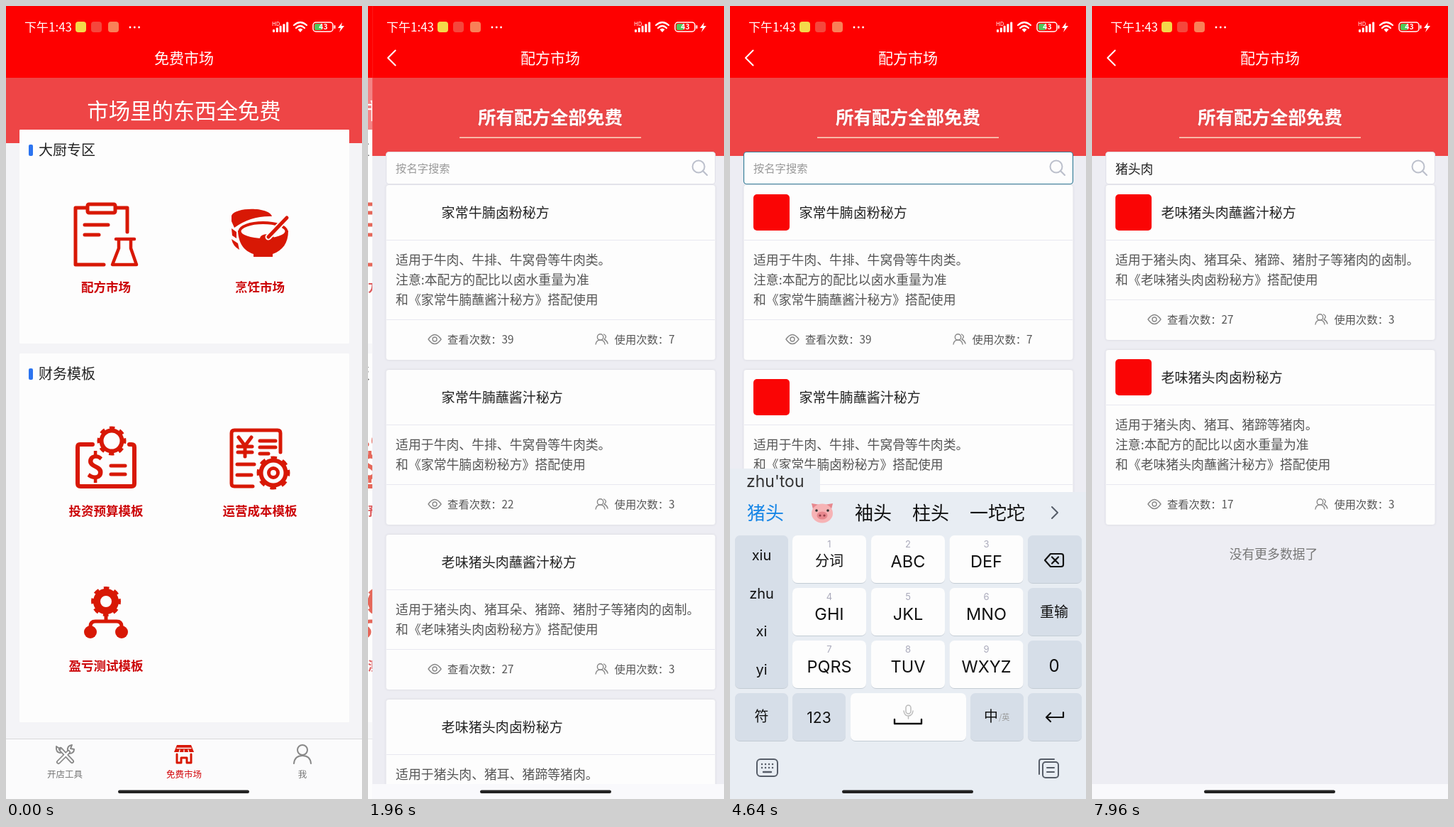
Animation of 502 by 1116 pixels, one loop 8 s. Source, as an HTML page:

```html
<!DOCTYPE html>
<html lang="zh-CN">
<head>
<meta charset="utf-8">
<style>
html, body { margin: 0; width: 100%; height: 100%; overflow: hidden; background: #fff; }
svg { display: block; font-family: "Noto Sans CJK SC", "Noto Sans CJK", sans-serif; }
.latin { font-family: Inter, "Noto Sans CJK SC", sans-serif; }
</style>
</head>
<body>
<svg id="stage" width="502" height="1116" viewBox="0 0 502 1116"></svg>
<script>
const RED = '#d81805', DARK = '#222', KEYBOARD = '#e8edf3';

// ---- drawing helpers (text is placed by its vertical centre) ----
const text = (x, cy, size, str, fill = DARK, extra = '') =>
  `<text x="${x}" y="${cy + size * .37}" font-size="${size}" fill="${fill}" ${extra}>${str}</text>`;
const mid = (x, cy, size, str, fill, extra = '') =>
  text(x, cy, size, str, fill, 'text-anchor="middle" ' + extra);
const rect = (x, y, w, h, fill, r = 0, extra = '') =>
  `<rect x="${x}" y="${y}" width="${w}" height="${h}" rx="${r}" fill="${fill}" ${extra}/>`;
const line = (d, color, w = 2, extra = '') =>
  `<path d="${d}" fill="none" stroke="${color}" stroke-width="${w}" stroke-linecap="round" stroke-linejoin="round" ${extra}/>`;
const shape = (d, fill) => `<path d="${d}" fill="${fill}"/>`;
const dot = (x, y, r, fill, extra = '') => `<circle cx="${x}" cy="${y}" r="${r}" fill="${fill}" ${extra}/>`;
const ring = (x, y, r, color, w = 2, extra = '') =>
  dot(x, y, r, 'none', `stroke="${color}" stroke-width="${w}" ${extra}`);
const group = (id, body, extra = '') => `<g id="${id}" ${extra}>${body}</g>`;

function gear(x, y, r, w) {
  const tooth = 2 * Math.PI * r / 16;
  return ring(x, y, r, RED, 6, `stroke-dasharray="${tooth}" transform="rotate(-11 ${x} ${y})"`) +
    ring(x, y, r - w / 2, RED, w);
}

// ---- status bar ----
function statusBar() {
  let s = text(26, 30, 17, '下午1:43', '#fff') +
    rect(98, 22, 15, 15, '#f4d94a', 4) + rect(120, 22, 15, 15, '#f5473c', 4) + rect(144, 22, 15, 15, '#f98058', 4);
  for (let i = 0; i < 3; i++) s += dot(175 + i * 6.3, 30, 1.4, '#fff');
  s += text(375, 25, 8, 'HD', '#fff');
  for (let i = 0; i < 5; i++) s += rect(376 + i * 4.8, 33 - i * 2.6, 3, 4 + i * 2.6, '#fff', 1);
  return s + line('M406 27Q415 19 424 27M409 31Q415 25 421 31', '#fff', 2.2) + shape('M411.500 33Q415 30 418.500 33L415 37Z', '#fff') +
    rect(433, 23, 28, 13, 'none', 4, 'stroke="#fff" stroke-width="1.500"') + rect(435, 25, 10, 9, '#50c85a', 2) +
    rect(462.5, 27, 2, 5, '#fff', 1) + mid(447.5, 29.5, 10.5, '43', '#fff', 'font-weight="700"') +
    shape('M474 23L468 31H472L470 37L477 28H473Z', '#fff');
}

// ---- market page ----
const clipboard = line('M138 364H98V284H114M155 284H171V318', RED, 5) + rect(115, 279, 39, 12, 'none', 2, `stroke="${RED}" stroke-width="5"`) +
  line('M111 308H144M111 322H131', RED, 5) + line('M155 328H181M159 329V341L150 364H184L176 341V329', RED, 4.500);
const bowls = shape('M318 303V295C322 283 371 282 375 296Q345 295 322 312ZM318 313L325 318V327L319 323ZM318 328L327 334L329 343Q320 338 318 328Z', RED) +
  shape('M327 316C328 339 340 346 349 349V353H376V349C390 344 398 334 398 316Z', RED) +
  `<ellipse cx="362.500" cy="317" rx="33" ry="12" fill="#fdfdfd" stroke="${RED}" stroke-width="4"/>` +
  `<ellipse cx="368" cy="327" rx="10" ry="6" fill="${RED}"/>` + line('M370 325L396 298', '#fdfdfd', 9) + line('M370 325L396 298', RED, 5);
const budget = line('M122 617H104Q101 617 101 621V672Q101 676 105 676H177Q181 676 181 672V621Q181 617 177 617H174', RED, 6) +
  gear(149, 612, 17.5, 6) + mid(126, 648, 46, '$', RED, 'font-weight="700"') + line('M148 647H168M148 659H168', RED, 5);
const cost = line('M348 676H322Q318 676 318 672V601Q318 597 322 597H383Q387 597 387 601V628', RED, 5) +
  line('M328 607L337 619L346 607M337 619V634M327 620H347M327 628H347M358 612H380M358 621H380M358 630H370M326 645H350M326 660H346', RED, 5) +
  gear(377, 657, 20.5, 6) + ring(377, 657, 6.5, RED, 5);
const balance = gear(141, 838, 18, 10) + line('M141 858V866M119 878V873Q119 866 126 866H156Q163 866 163 873V878', RED, 5) +
  dot(119, 881, 9, RED) + dot(163, 881, 9, RED);

function market() {
  const bar = (y, s) => rect(32, y - 8, 6, 16, '#2c74f0', 2) + text(46, y, 20, s);
  const label = (x, y, s) => mid(x, y, 17.5, s, '#cc0508', 'font-weight="700"');
  const card = (y, h) => rect(19, y, 465, h, '#fdfdfd', 1);
  return rect(0, 0, 502, 1116, '#f4f4f7') + rect(0, 101, 502, 92, '#ee4546') +
    mid(251, 148, 30.4, '市场里的东西全免费', '#fff') + card(174, 301) + card(489, 519) +
    bar(203, '大厨专区') + bar(518, '财务模板') + clipboard + bowls + budget + cost + balance +
    label(141, 396, '配方市场') + label(358, 396, '烹饪市场') + label(141, 711, '投资预算模板') +
    label(358, 711, '运营成本模板') + label(141, 929, '盈亏测试模板') +
    rect(0, 1031, 502, 85, '#fbfbfc') + rect(0, 1031, 502, 1, '#d9d9db') +
    line('M74 1064L88 1050M77 1046L93 1063', '#888', 6) + line('M74 1064L88 1050M77 1046L93 1063', '#fbfbfc', 2.5) +
    line('M71 1042L77 1046M71 1042Q70 1051 77 1051M87 1048Q86 1041 93 1040L91 1045L96 1046Q96 1052 89 1052', '#888', 2) +
    shape('M241 1040H261L265 1050H237Z', RED) + line('M241 1044.500H261M245 1047L244 1051M251 1047V1051M257 1047L258 1051', '#fbfbfc', 1.3) +
    line('M241 1053V1065H247V1058H255V1065H261V1053', RED, 3) +
    ring(418, 1047, 7, '#888', 2) + line('M406 1066Q407 1055 418 1055Q429 1055 430 1066', '#888') +
    mid(83, 1081, 12.5, '开店工具', '#777') + mid(251, 1081, 12.5, '免费市场', '#d3070b') + mid(418, 1081, 12.5, '我', '#777');
}

// ---- recipe page ----
const BEEF_RUB = '家常牛腩卤粉秘方', BEEF_DIP = '家常牛腩蘸酱汁秘方',
  PORK_DIP = '老味猪头肉蘸酱汁秘方', PORK_RUB = '老味猪头肉卤粉秘方';
const NOTE = '注意:本配方的配比以卤水重量为准';
const pair = name => `和《${name}》搭配使用`;
const beef = '适用于牛肉、牛排、牛窝骨等牛肉类。';
const recipes = [
  [BEEF_RUB, [beef, NOTE, pair(BEEF_DIP)], 39, 7],
  [BEEF_DIP, [beef, pair(BEEF_RUB)], 22, 3],
  [PORK_DIP, ['适用于猪头肉、猪耳朵、猪蹄、猪肘子等猪肉的卤制。', pair(PORK_RUB)], 27, 3],
  [PORK_RUB, ['适用于猪头肉、猪耳、猪蹄等猪肉。', NOTE, pair(PORK_DIP)], 17, 3]
];

function recipeList(items) {
  let y = 252, s = '';
  for (const [name, lines, views, uses] of items) {
    const foot = y + 105 + lines.length * 28;
    s += rect(19.5, y, 464, foot + 57 - y, '#fdfdfd', 4, 'filter="url(#soft)"') +
      rect(33, y + 13, 51, 51, '#fa0505', 5, 'class="logo"') + text(97.5, y + 39, 19.05, name) +
      rect(20, y + 77, 463, 1, '#e8e8f0') + rect(20, foot, 463, 1, '#e8e8f0');
    lines.forEach((l, i) => s += text(33, y + 105 + i * 28, 17.85, l, '#555'));
    const c = foot + 28;
    s += line(`M79 ${c}Q88 ${c - 13} 97 ${c}Q88 ${c + 13} 79 ${c}Z`, '#888', 1.4) + ring(88, c, 3, '#888', 1.4) +
      ring(321.5, c - 3, 4.2, '#888', 1.4) + line(`M315 ${c + 7}Q316 ${c + 1} 321.500 ${c + 1}Q327 ${c + 1} 328 ${c + 7}M326.500 ${c - 7}Q332 ${c - 4} 327 ${c}Q331 ${c + 2} 332 ${c + 6}`, '#888', 1.4) +
      text(106, c, 15.3, '查看次数：' + views, '#555') + text(341.5, c, 15.3, '使用次数：' + uses, '#555');
    y = foot + 71;
  }
  return s;
}

function recipePage() {
  return rect(0, 0, 502, 1116, '#ededf3') + rect(0, 0, 502, 101, '#fe0000') + rect(0, 101, 502, 110, '#ee4546') +
    line('M32.500 62.500L22 73L32.500 83.500', '#fff', 2) + mid(251, 73, 21, '配方市场', '#fff') +
    mid(251, 157, 25.5, '所有配方全部免费', '#fff', 'font-weight="700" filter="url(#soft)"') + rect(123, 184.5, 256, 1.3, '#fff3d8') +
    group('all', recipeList(recipes)) +
    group('found', recipeList(recipes.slice(2)) + mid(256, 771, 17.8, '没有更多数据了', '#777')) +
    rect(19.5, 205.5, 464, 45, '#fdfdfd', 4, 'id="field" stroke-width="1.200"') +
    group('hint', text(33, 228, 15.3, '按名字搜索', '#999')) + group('query', text(33, 229, 17.8, '猪头肉')) +
    rect(86.3, 216, 1.2, 25, '#222', 0, 'id="caret"') +
    ring(460, 226, 8.5, '#bcc0cc', 2) + line('M466 232L472 238', '#bcc0cc', 2.2) +
    rect(498, 101, 4, 583, 'rgba(60,60,70,.2)', 0, 'id="scroll"') +
    rect(0, 1095, 502, 21, '#f9f9fc');
}

// ---- keyboard ----
const ICON = '#565d68';
const keyX = [7, 88, 199, 309.5, 420], keyY = [745, 819, 893, 967];
const shadowed = 'filter="url(#key)"';

function keyboard() {
  const key = (x, y, w, h, fill) => rect(x, y, w, h, fill, 7, shadowed);
  const GREY = '#d6dee8', WHITE = '#fdfdfd', latin = 'class="latin"';
  let s = rect(0, 684, 502, 432, KEYBOARD) + key(7, 745, 75, 215, GREY);
  ['分词', 'ABC', 'DEF', 'GHI', 'JKL', 'MNO', 'PQRS', 'TUV', 'WXYZ'].forEach((l, i) => {
    const x = keyX[1 + i % 3], y = keyY[i / 3 | 0];
    s += key(x, y, 104, 67, WHITE) + mid(x + 52, y + 12, 13, i + 1, '#aab', latin) +
      mid(x + 52, y + 36, i ? 23.5 : 20, l, '#111', latin);
  });
  for (const y of keyY) s += key(420, y, 76, 67, GREY);
  return s + key(7, 967, 75, 67, GREY) + key(88, 967, 75, 67, GREY) + key(170, 967, 163, 67, WHITE) + key(339, 967, 75, 67, GREY) +
    line('M444 780L452 771H467Q470 771 470 774V786Q470 789 467 789H452ZM454 775.500L463 784.500M463 775.500L454 784.500', '#111', 2.200) +
    mid(457, 853, 20, '重输', '#111') + mid(457, 928, 24, '0', '#111', latin) +
    line('M470 994V1001H446M452 995L446 1001L452 1007', '#111', 2.200) +
    mid(44.5, 1000, 20, '符', '#111') + mid(125.5, 1001, 21, '123', '#111', latin) +
    line('M232 1004V1010H270V1004', '#111', 2.400) + rect(248, 984, 7, 12, 'none', 3.5, 'stroke="#bbb" stroke-width="1.500"') +
    line('M245 992Q246 999 251.500 999Q257 999 258 992M251.500 999V1003', '#bbb', 1.500) +
    text(358, 1000, 20, '中', '#111') + text(379, 1001, 11, '/英', '#999') +
    rect(38, 1060, 29, 24, 'none', 5, `stroke="${ICON}" stroke-width="2"`) +
    line('M45 1067H45.100M50 1067H50.100M55 1067H55.100M60 1067H60.100M45 1072H45.100M50 1072H50.100M55 1072H55.100M60 1072H60.100M47 1078H58', ICON, 2.400) +
    rect(441, 1064, 22, 22, 'none', 4, `stroke="${ICON}" stroke-width="2"`) +
    line('M436 1081V1063Q436 1060 439 1060H457M447 1072H457M447 1078H457', ICON) +
    group('tools', tools()) + group('marks', mid(44.5, 775, 26, ',', '#111', latin) + ring(44, 832, 3.5, '#111', 2.2) +
      mid(44.5, 880, 24, '?', '#111', latin) + mid(44.5, 934, 24, '!', '#111', latin)) +
    group('typed', '') +
    group('next', mid(29, 713, 30, ',', '#111', latin) +
      line('M400 707H397Q391 707 391 713Q391 719 397 719H399M404 719H407Q413 719 413 713Q413 707 407 707H405M397 713H407', ICON, 2, 'transform="rotate(45 402 713)"') +
      ring(458, 713, 10.5, ICON, 2) + line('M454 709L462 717M462 709L454 717', ICON)) +
    rect(0, 0, 104, 67, 'rgba(70,90,120,.2)', 7, 'id="press"');
}

function tools() {
  let s = '';
  for (const x of [34, 46]) for (const y of [703, 715]) s += rect(x, y, 8.5, 8.5, 'none', 2.5, `stroke="${ICON}" stroke-width="2"`);
  for (let i = 0; i < 10; i++) s += rect(101.5 + i % 5 * 4.8, 705 + (i / 5 | 0) * 6, 3.6, 4, ICON, 1);
  s += rect(105, 717, 16, 4, ICON, 1) + ring(181.5, 713, 10.5, ICON, 2) + dot(178, 710, 1.6, ICON) + dot(185, 710, 1.6, ICON) +
    line('M176 715Q181.500 722 187 715', ICON) + line('M243 708L239 713L243 718M258 708L262 713L258 718M247 704H254M247 722H254M250.500 704V722', ICON) +
    rect(315, 702, 9, 15, 'none', 4.5, `stroke="${ICON}" stroke-width="2"`) + line('M310 713Q312 721 319.500 721Q327 721 329 713M319.500 721V724', ICON);
  for (const x of [374, 389]) for (const y of [699, 714]) s += rect(x, y, 13.5, 13.5, '#484c55', 2);
  return s + ring(396, 706, 4, '#fff', 1.8) + line('M377 721H385M381 717V725', '#fff') + ring(396, 721, 3.5, '#aaa', 1.3) +
    dot(406, 699, 4.5, '#f5151c') + line('M449 709L458 718L467 709', ICON);
}

const pig = x => shape(`M${x - 15} 700L${x - 3} 702L${x - 12} 712ZM${x + 15} 700L${x + 3} 702L${x + 12} 712Z`, '#e7878d') +
  `<ellipse cx="${x}" cy="714" rx="15" ry="13.500" fill="#f6b3b5"/><ellipse cx="${x}" cy="717" rx="7.500" ry="5.500" fill="#e7878d"/>` +
  dot(x - 3, 717, 1.6, '#8f3f48') + dot(x + 3, 717, 1.6, '#8f3f48') + dot(x - 8, 710, 1.8, '#333') + dot(x + 8, 710, 1.8, '#333');

// time, digit key, composition, candidates (* is the pig), syllables
const strokes = [
  [3560, 9, 'y', '一 有 也 用 在', 'w x y z'],
  [3760, 4, 'xi', '系 以 西 洗 喜', 'xi yi zi w'],
  [3960, 8, 'zhu', '住 主 祝 猪 朱', 'xiu zhu xi yi'],
  [4160, 8, "zhu't", '祝她 主题 住 猪', 'xiu zhu xi yi'],
  [4360, 6, "zhu'to", '主头 猪头 住 主', 'xiu zhu xi yi'],
  [4540, 8, "zhu'tou", '猪头 * 袖头 柱头 一坨坨', 'xiu zhu xi yi'],
  [4800, 7, "zhu'tou's", '猪头 * 猪头是 柱头', 'xiu zhu xi yi'],
  [5000, 6, "zhu'tou'ro", '猪头肉 猪头 * 柱头', 'xiu zhu xi yi'],
  [5160, 8, "zhu'tou'rou", '猪头肉 猪头 * 袖头', 'xiu zhu xi yi']
];

function typing([, , spell, words, sounds]) {
  let x = 24, list = '';
  words.split(' ').forEach((w, i) => {
    list += w === '*' ? pig(x + 25) : text(x, 713, 26, w, i ? '#111' : '#1585e6');
    x += (w === '*' ? 42 : w.length * 26) + 29;
  });
  let s = shape(`M0 685V651H${46 + spell.length * 11}q4 0 4 4V685Z`, KEYBOARD) +
    text(23, 668, 23, spell, '#333', 'class="latin"') + `<g clip-path="url(#bar)">${list}</g>` + line('M454 705L462 713L454 721', ICON);
  sounds.split(' ').forEach((w, i) => s += mid(44.5, 773 + i * 53.4, 20, w, '#111', 'class="latin"'));
  return s;
}

// ---- build ----
const $ = id => document.getElementById(id);
$('stage').innerHTML = `<defs>
  <filter id="soft"><feDropShadow dx="0" dy="0" stdDeviation="1.800" flood-color="#556" flood-opacity=".2"/></filter>
  <filter id="key"><feDropShadow dx="0" dy="1" stdDeviation=".6" flood-color="#567" flood-opacity=".25"/></filter>
  <clipPath id="bar"><rect x="0" y="685" width="419" height="58"/></clipPath></defs>` +
  rect(0, 0, 502, 1116, '#fff') + group('market', market()) +
  group('marketHead', rect(0, 0, 502, 101, '#fe0000') + mid(251, 73, 21, '免费市场', '#fff')) +
  group('recipes', recipePage()) + group('keyboard', keyboard()) + statusBar() + rect(158, 1103.5, 185, 4.5, DARK, 2.2);

const logos = document.querySelectorAll('.logo');
const show = (id, on) => $(id).style.display = on ? '' : 'none';
const shift = (id, x, y) => $(id).setAttribute('transform', `translate(${x} ${y})`);
const ease = (t, from, length) => 1 - (1 - Math.min(1, Math.max(0, (t - from) / length))) ** 3;

const FOCUS = 2720, COMMIT = 5840, ENTER = 7040, HIDE = 7180, FOUND = 7520;
let shown = null;

function draw() {
  const t = performance.now() % 8000;
  const slide = ease(t, 1730, 300);
  shift('market', -125 * slide, 0);
  $('market').style.opacity = 1 - .35 * slide;
  shift('recipes', 502 * (1 - slide), 0);
  show('market', slide < 1);
  logos.forEach(l => l.style.display = t > 2080 && (t < FOUND || t > FOUND + 80) ? '' : 'none');

  const focused = t >= FOCUS && t < HIDE, done = t >= COMMIT;
  $('field').setAttribute('stroke', focused ? '#39809a' : '#e2e2ea');
  show('hint', !done);
  show('query', done);
  show('all', t < FOUND);
  show('found', t >= FOUND);
  show('scroll', t >= 3080 && t < 3600);
  show('caret', focused && (t - (done ? COMMIT : FOCUS)) % 1000 < 500);
  $('caret').setAttribute('x', done ? 86.3 : 33);

  const up = ease(t, 2780, 300) - ease(t, HIDE, 280);
  show('keyboard', up > 0);
  shift('keyboard', 0, 432 * (1 - up));
  const stroke = done ? undefined : strokes.findLast(k => t >= k[0]);
  show('tools', !stroke && !done);
  show('marks', !stroke);
  show('next', done);
  if (stroke !== shown) $('typed').innerHTML = stroke ? typing(stroke) : '';
  shown = stroke;

  const enter = t >= ENTER && t < ENTER + 100;
  const tap = stroke && t < stroke[0] + 90;
  show('press', enter || tap);
  const i = tap ? stroke[1] - 1 : 0;
  $('press').setAttribute('width', enter ? 76 : 104);
  shift('press', enter ? 420 : keyX[1 + i % 3], enter ? 967 : keyY[i / 3 | 0]);
  requestAnimationFrame(draw);
}
draw();
</script>
</body>
</html>
```
